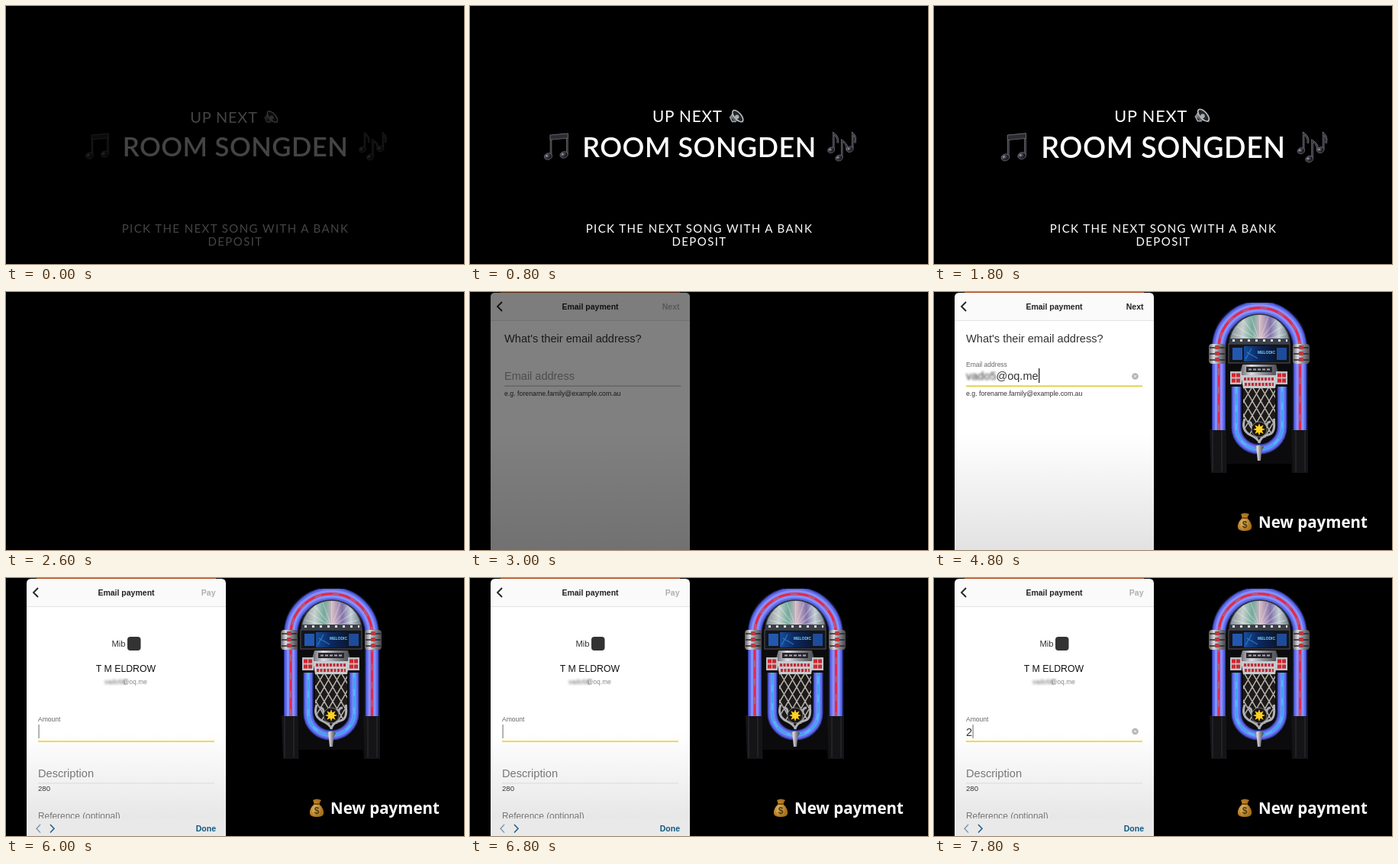
Recreate the animation shown at these times as an HTML page. Size 600 by 338 pixels, loop 8 s.

```html
<!DOCTYPE html>
<html lang="en">
<head>
<meta charset="utf-8">
<title>Song machine</title>
<style>
html, body { margin: 0; width: 100%; height: 100%; overflow: hidden; background: #000; }
svg { display: block; width: 100%; height: 100%; }
text { white-space: pre; }
.caps { font-family: Lato, sans-serif; fill: #fff; text-anchor: middle; }
.ui { font-family: "Liberation Sans", Arial, sans-serif; fill: #333; }
.b { font-weight: 700; font-size: 10.5px; fill: #222; }
.s { font-size: 8.5px; fill: #666; }
.l { font-size: 14.5px; }
.mid { text-anchor: middle; }
.end { text-anchor: end; }
.blur { filter: blur(1.7px); }
.line { fill: none; }
</style>
</head>
<body>
<svg viewBox="0 0 600 338" preserveAspectRatio="none">
<defs>
  <clipPath id="phoneClip"><path d="M27 338V7q0-6 6-6H282q6 0 6 6V338z"/></clipPath>
  <clipPath id="bodyClip"><rect x="27" y="38" width="261" height="300"/></clipPath>
  <clipPath id="boxClip"><rect x="360" y="14" width="132" height="224"/></clipPath>
  <clipPath id="grilleClip"><path d="M405 126H447V166Q447 192 426 192T405 166z"/></clipPath>
  <linearGradient id="paper" x2="0" y2="1">
    <stop offset=".55" stop-color="#fff"/><stop offset="1" stop-color="#e2e2e2"/>
  </linearGradient>
  <linearGradient id="dome">
    <stop stop-color="#7d8a92"/><stop offset=".22" stop-color="#c7d0cc"/><stop offset=".38" stop-color="#72a99c"/>
    <stop offset=".52" stop-color="#d4b7c4"/><stop offset=".68" stop-color="#8173ab"/><stop offset=".82" stop-color="#c4cfd2"/>
    <stop offset="1" stop-color="#657580"/>
  </linearGradient>
  <linearGradient id="chrome">
    <stop stop-color="#5c5c62"/><stop offset=".3" stop-color="#dcdce0"/><stop offset=".6" stop-color="#8e8e96"/><stop offset="1" stop-color="#45454b"/>
  </linearGradient>
  <linearGradient id="screen"><stop stop-color="#164d9c"/><stop offset=".45" stop-color="#0b2a62"/><stop offset="1" stop-color="#0a1836"/></linearGradient>
  <radialGradient id="bag" cx=".4" cy=".55"><stop stop-color="#e9bd62"/><stop offset="1" stop-color="#a8701c"/></radialGradient>
  <radialGradient id="ball" cx=".35" cy=".35"><stop stop-color="#c4c4d2"/><stop offset=".35" stop-color="#4c4c58"/><stop offset="1" stop-color="#1a1a20"/></radialGradient>
  <linearGradient id="horn" x2="1" y2="1"><stop stop-color="#d5d7d9"/><stop offset=".5" stop-color="#55595d"/><stop offset="1" stop-color="#a5a8ab"/></linearGradient>
</defs>

<g id="intro">
  <g id="grow">
    <text class="caps" x="285.5" y="153" font-size="20" letter-spacing=".8">UP NEXT</text>
    <g transform="translate(347 146)">
      <path d="M-8 0L-3-8Q7-4 9 7L-3 5z" fill="url(#horn)"/>
      <ellipse cx="2" cy="-1" rx="4.2" ry="9" transform="rotate(-42 2 -1)" fill="#24272a" stroke="#c2c5c8" stroke-width="1.4"/>
      <circle cx="1" r="2.6" fill="#a9adb0"/>
      <path class="line" d="M-8 0l3 6 5 0" stroke="#a0a4a8" stroke-width="1.6"/>
    </g>
    <text class="caps" x="300.5" y="196.7" font-size="34.6" font-weight="600" letter-spacing=".5">ROOM SONGDEN</text>
    <g id="pair"></g>
    <g id="trio"></g>
  </g>
  <text class="caps" x="300.5" y="297.4" font-size="15" letter-spacing="1.4">PICK THE NEXT SONG WITH A BANK</text>
  <text class="caps" x="300.5" y="314.4" font-size="15" letter-spacing="1.4">DEPOSIT</text>
</g>

<g id="phone">
  <rect x="40" width="235" height="2" fill="#a84a18"/>
  <g clip-path="url(#phoneClip)">
    <rect x="27" y="1" width="261" height="337" fill="url(#paper)"/>
    <g clip-path="url(#bodyClip)">
      <g id="emailPage" class="ui">
        <text x="42" y="66" font-size="14.6">What's their email address?</text>
        <text id="hint" class="l" x="42" y="115" fill="#999">Email address</text>
        <text id="label" class="s" x="42" y="98">Email address</text>
        <text id="user" class="l blur" x="42" y="115"></text>
        <text id="host" class="l" x="81.5" y="115"></text>
        <rect id="rule" x="42" y="122.5" width="231" height="1.5"/>
        <text x="42" y="136" font-size="8.76">e.g. forename.family@example.com.au</text>
        <rect id="caret" y="100" width="1.3" height="19" fill="#222"/>
        <g id="clear1" transform="translate(263.5 110.5)"></g>
      </g>
      <g id="payPage" class="ui">
        <rect x="27" y="38" width="261" height="300" fill="url(#paper)"/>
        <text x="156.5" y="90" class="end" font-size="11.2">Mib</text>
        <rect x="159" y="77" width="17.5" height="18" rx="4" fill="#333"/>
        <text x="157" y="123" class="mid" font-size="12.3" style="fill:#111">T M ELDROW</text>
        <text x="129" y="139" class="s blur">vado58</text>
        <text x="185" y="139" class="s end" style="fill:#888">@oq.me</text>
        <text x="42" y="188" class="s">Amount</text>
        <text id="amount" class="l" x="42" y="207">2</text>
        <rect id="caret2" y="192" width="1.1" height="18" fill="#777"/>
        <rect x="42" y="213.3" width="231" height="1.6" fill="#f5cf1c"/>
        <g id="clear2" transform="translate(263.5 201)"></g>
        <text x="42" y="261" font-size="14.6" style="fill:#777">Description</text>
        <rect x="42" y="268.5" width="231" height=".8" fill="#d4d4d4"/>
        <text x="42" y="279" font-size="9.6">280</text>
        <text x="42" y="316" font-size="11.9" style="fill:#777">Reference (optional)</text>
      </g>
    </g>
    <g id="bar" class="ui">
      <rect x="27" y="315" width="261" height="23" fill="#e9e9ea"/>
      <path class="line" d="M45 323l-5 5.3 5 5.3" stroke="#6d93a9" stroke-width="1.3"/>
      <path class="line" d="M58 323l5 5.3-5 5.3" stroke="#195f84" stroke-width="1.5"/>
      <text class="b end" x="275" y="332" style="fill:#12597c">Done</text>
    </g>
    <rect x="27" y="1" width="261" height="36" fill="#fafafa"/>
    <rect x="27" y="37" width="261" height="1" fill="#e3e3e3"/>
    <path class="line" d="M42 13l-6 6 6 6" stroke="#222" stroke-width="1.8"/>
    <text class="ui b mid" x="157.5" y="23">Email payment</text>
    <text id="action" class="ui b end" x="274.5" y="23"></text>
  </g>
</g>

<g id="juke" clip-path="url(#boxClip)">
  <path d="M364 237V76Q364 14 426 14T490 76V237H468V225H384V237z" fill="#0b0b0d"/>
  <path d="M361 180H383V237H363zM468 180H490V237H470z" fill="#141416"/>
  <path d="M365 182V235M377 182V235M474 182V235M486 182V235" stroke="#222226" stroke-width="2"/>
  <g id="arch"></g>
  <path d="M387 67A39.5 38 0 0 1 466 67z" fill="url(#dome)" stroke="#33363c" stroke-width="1.5"/>
  <path id="rays" stroke="#fff" stroke-opacity=".28" stroke-width="1.5"/>
  <rect x="388" y="61" width="77" height="6" fill="#3b3f48"/>
  <path d="M391 63.5H463" stroke="#dfe3e8" stroke-width="3" stroke-dasharray="3 7"/>
  <rect x="386" y="68" width="80" height="25" fill="#14151b" stroke="#55565d"/>
  <rect x="391" y="73" width="13" height="16" fill="#2258b0"/>
  <rect x="449" y="73" width="13" height="16" fill="#1c4c9c"/>
  <rect x="406" y="71" width="41" height="20" fill="url(#screen)"/>
  <path d="M408 88L416 74M410 79L424 87" stroke="#3f8de0" stroke-width="1.2" opacity=".7"/>
  <text class="ui" x="424" y="81" font-size="5" font-weight="700" style="fill:#7fd3ff">MELODIC</text>
  <path d="M404 95H448L452 109H400z" fill="url(#chrome)"/>
  <rect x="409" y="98" width="34" height="7" fill="#26272c"/>
  <path d="M412 101.5H440" stroke="#a9adb4" stroke-width="2" stroke-dasharray="4 2"/>
  <g id="u"></g>
  <rect x="388" y="104" width="15" height="17" fill="#bfc0c5"/><rect x="448" y="104" width="15" height="17" fill="#bfc0c5"/>
  <path d="M390 109H401M390 116H401M450 109H461M450 116H461" stroke="#d0272d" stroke-width="5" stroke-dasharray="5 1"/>
  <path d="M402 109H450L447 126H405z" fill="#c9cace"/>
  <path d="M406 114H446M407 121H445" stroke="#c32a35" stroke-width="4" stroke-dasharray="3 1.5"/>
  <g clip-path="url(#grilleClip)">
    <rect x="404" y="125" width="44" height="70" fill="#1c1a1a"/>
    <path id="mesh" stroke="#b9b3aa" stroke-width="1.5"/>
  </g>
  <path class="line" d="M407 166Q402 181 414 187T426 198Q428 189 438 187T445 166M411 170q6 0 5 8M441 170q-6 0-5 8" stroke="#aeb0b5" stroke-width="3"/>
  <circle cx="426" cy="180" r="10" fill="#181310" stroke="#77777c"/>
  <path id="star" fill="#ffd21f"/>
  <path d="M420 203Q426 198 432 203L429 210 428 221H424L423 210z" fill="url(#chrome)"/>
  <g id="clasps"></g>
</g>

<g id="notice">
  <path d="M402 291Q407 288 413 291L410 296Q417 302 416 309 415 313 407 313T398 309Q397 302 404 296z" fill="url(#bag)"/>
  <path d="M403 296H411" stroke="#7a4c12" stroke-width="2"/>
  <text x="407" y="309" text-anchor="middle" font-family="Liberation Sans, sans-serif" font-weight="700" font-size="12" fill="#4c350b">$</text>
  <text x="425" y="309" font-family="Noto Sans, Open Sans, sans-serif" font-weight="700" font-size="20.5" fill="#fff">New payment</text>
</g>
</svg>
<script>
const LOOP = 8000, STEP = 200;
const USER = 'vado5', HOST = '@oq.me';
const $ = id => document.getElementById(id);
const clamp = v => Math.max(0, Math.min(1, v));
const ramp = (t, from, to) => clamp((t - from) / (to - from));
const ease = p => 1 - Math.pow(1 - p, 3);
const fade = (id, v) => $(id).setAttribute('opacity', v);
const show = (id, on) => { $(id).style.display = on ? '' : 'none'; };
const move = (id, x) => $(id).setAttribute('transform', `translate(${x} 0)`);

function note(x, y, r) {
  return `<ellipse cx="${x}" cy="${y}" rx="${r}" ry="${r * .8}" transform="rotate(-18 ${x} ${y})" fill="url(#ball)" stroke="#74747e" stroke-width=".7"/>`;
}

function stems(d) {
  return `<path class="line" d="${d}" stroke="#777780" stroke-width="2.4"/>`
    + `<path class="line" d="${d}" stroke="#2a2a30" stroke-width="1.1"/>`;
}

function tube(d, width, core, coreWidth, glow) {
  const layer = (color, w, more = '') =>
    `<path class="line" d="${d}" stroke="${color}" stroke-width="${w}" ${more}/>`;
  return layer('#3540a8', width) + layer('#5f6cec', width - 3) + layer('#8590ff', width - 8)
    + layer(core, coreWidth) + layer('#58c8ff', 2, `class="line glow" stroke-dasharray="9 15" opacity="${glow}"`);
}

function build() {
  $('pair').innerHTML = stems('M113 195V170L133.500 168V193')
    + '<path d="M112 169L134.500 167V173L112 175z" fill="#2c2c31" stroke="#74747e" stroke-width=".7"/>'
    + note(109.5, 196, 5) + note(129.5, 194, 5);
  $('trio').innerHTML = stems('M470 187V167q7 5 5 12M480.500 197V176q8 5 6 12M494 186V167q5 4 3 12')
    + note(467, 188, 4.4) + note(477, 198, 4.6) + note(490.5, 187, 4.4);
  $('arch').innerHTML = tube('M373 181V74A53 53 0 0 1 479.5 74V181', 18, '#e22b48', 3.5, .3);
  $('u').innerHTML = tube('M396 124V177A30 29 0 0 0 456 177V124', 13, '#3aa5ee', 3, .65);

  let rays = '', mesh = '', clasps = '', star = '';
  for (let i = 1; i < 10; i++) {
    const a = Math.PI * (1 + i / 10);
    rays += `M426.5 64L${426.5 + 36 * Math.cos(a)} ${66 + 35 * Math.sin(a)}`;
  }
  for (let x = 340; x < 510; x += 11) mesh += `M${x} 124l42 72M${x} 124l-42 72`;
  for (let i = 0; i < 16; i++) {
    const a = i * Math.PI / 8, r = i % 2 ? 4 : 8;
    star += `${i ? 'L' : 'M'}${426 + r * Math.cos(a)} ${180 + r * Math.sin(a)}`;
  }
  for (const x of [360, 470]) {
    clasps += `<rect x="${x}" y="68" width="22" height="26" rx="4" fill="url(#chrome)"/>`;
    for (const y of [73, 81, 89]) {
      clasps += `<path d="M${x + 1} ${y}h20" stroke="#2b2226" stroke-width="1.5"/>`
        + `<rect x="${x + 8}" y="${y - 3}" width="6" height="5" rx="1" fill="#b73b45"/>`;
    }
  }
  $('rays').setAttribute('d', rays);
  $('mesh').setAttribute('d', mesh);
  $('star').setAttribute('d', star + 'z');
  $('clasps').innerHTML = clasps;
  for (const id of ['clear1', 'clear2']) {
    $(id).innerHTML = '<circle r="4.3" fill="#b5b5b5"/><path d="M-1.6-1.6l3.2 3.2M1.6-1.6l-3.2 3.2" stroke="#fff"/>';
  }
}

function draw(t) {
  // Title card
  fade('intro', Math.min(.27 + t / 1000, 1 - ramp(t, 2200, 2600)));
  $('grow').setAttribute('transform', `translate(301 168) scale(${1 + t * 4.65e-5}) translate(-301 -168)`);

  // Screens
  fade('phone', ramp(t, 2600, 3400));
  fade('juke', ramp(t, 3000, 3400));
  fade('notice', ramp(t, 3800, 4200));
  const enter = t < 3400 ? 261 * Math.exp((2600 - t) / 90) : 0;
  const push = ease(ramp(t, 5000, 5600));
  move('emailPage', enter - 80 * push);
  move('payPage', 261 * (1 - push));
  show('payPage', push > 0);

  // Email field
  const focus = t >= 3200;
  const typed = Math.max(0, Math.min(11, Math.floor((t - 3600) / 100)));
  show('hint', !focus);
  show('label', focus);
  show('caret', focus);
  show('clear1', typed > 0);
  $('rule').setAttribute('fill', focus ? '#dccb25' : '#c9c9c9');
  $('user').textContent = USER.slice(0, typed);
  $('host').textContent = HOST.slice(0, Math.max(0, typed - USER.length));
  const caretX = typed <= USER.length ? typed * 7.9
    : 39.5 + $('host').getComputedTextLength();
  $('caret').setAttribute('x', 42.5 + caretX);

  // Payment form
  const paid = t >= 7400;
  show('bar', t >= 5600);
  show('amount', paid);
  show('clear2', paid);
  $('caret2').setAttribute('x', paid ? 50.5 : 42.5);
  const action = $('action');
  action.textContent = push > .5 ? 'Pay' : 'Next';
  action.style.fill = typed === 11 && push <= .5 ? '#222' : '#b0b0b0';

  // Running lights
  for (const p of document.querySelectorAll('[stroke-dasharray="9 15"]')) {
    p.setAttribute('stroke-dashoffset', -t / 50);
  }
}

build();
const start = performance.now();
function tick() {
  const t = (performance.now() - start) % LOOP;
  draw(Math.floor(t / STEP) * STEP);
  requestAnimationFrame(tick);
}
tick();
</script>
</body>
</html>
```
